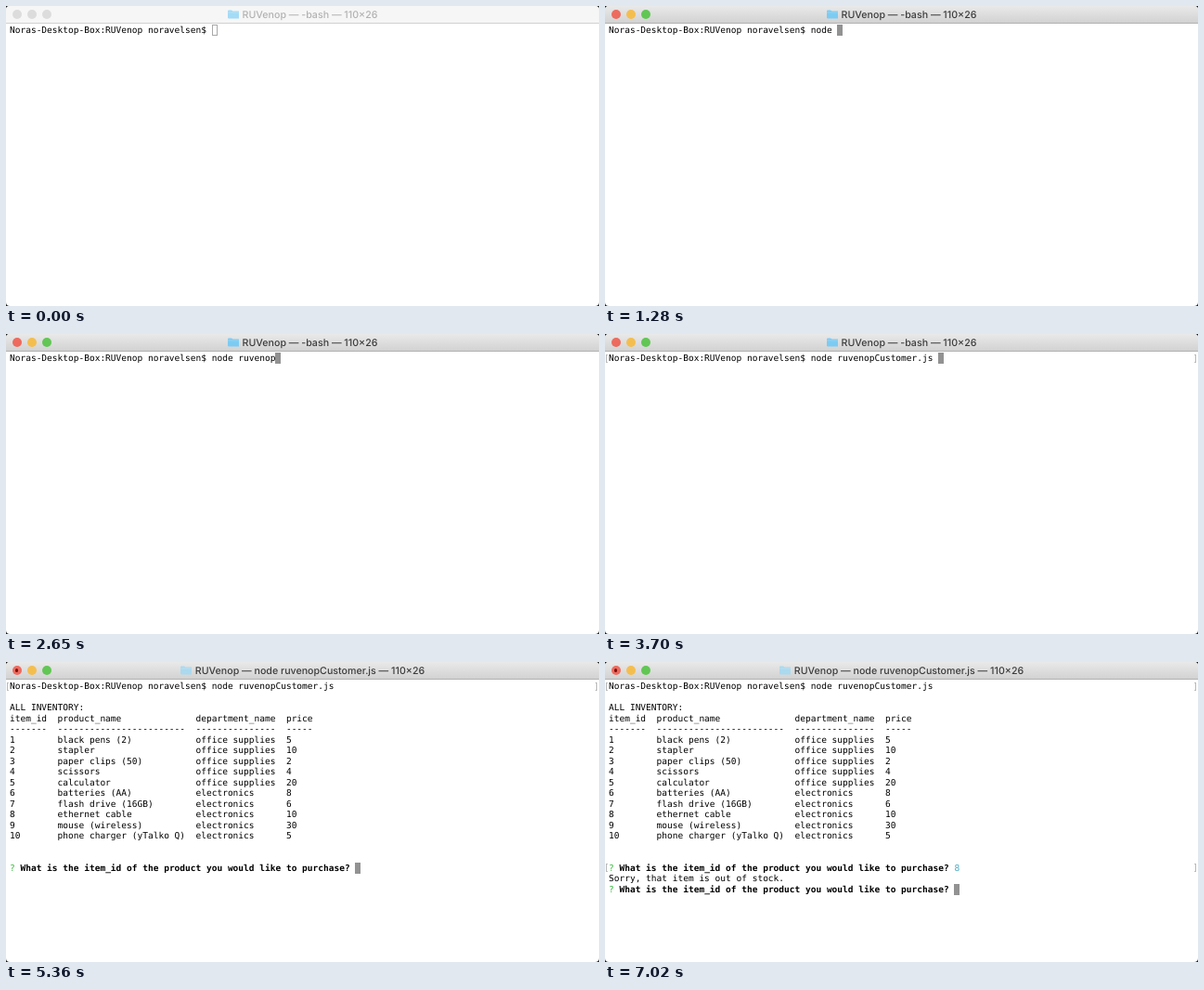
Write an HTML page that moves like this. It is 639x323 px and loops after 7.78 s.

```html
<!DOCTYPE html>
<html lang="en">
<head>
<meta charset="utf-8">
<title>Terminal session</title>
<style>
  html, body { margin: 0; width: 100%; height: 100%; overflow: hidden; background: #161616; }
  .window {
    position: relative; width: 639px; height: 323px; overflow: hidden;
    background: #fff; border-radius: 4px; text-rendering: geometricPrecision;
  }
  .bar {
    position: absolute; inset: 0 0 auto; height: 18px;
    display: flex; align-items: center; justify-content: center; gap: 3.5px;
    background: linear-gradient(#e9e9e9, #d2d2d2); border-bottom: 1px solid #b1b1b1;
    font: 500 10.65px/18px Inter, sans-serif; color: #3c3c3c; white-space: pre;
  }
  #title { position: relative; top: 1px; }
  .light { position: absolute; top: 4px; width: 10px; height: 10px; border-radius: 50%; }
  .close { left: 6.5px; background: #ed6a5e; }
  .mini { left: 22.8px; background: #f4be4f; }
  .zoom { left: 39px; background: #62c655; }
  .folder { width: 12.5px; height: 10px; fill: #7ccbf3; }
  .idle .bar { background: #f6f6f6; border-color: #d0d0d0; color: #b2b2b2; }
  .idle .light { background: #dcdcdc; }
  .idle .folder { fill: #a4dbf6; }
  .running .folder { fill: #abd9ee; }
  .running .close::after {
    content: ""; position: absolute; inset: 3.2px; border-radius: 50%; background: #7c0f0b;
  }
  .screen {
    position: absolute; left: 4px; top: 21.25px; margin: 0; color: #000;
    font: 9.53px/11.5px "DejaVu Sans Mono", monospace;
  }
  .cursor { background: #929292; padding: 1px .3px 0 0; }
  .idle .cursor { background: none; box-shadow: inset 0 0 0 1px #a8a8a8; }
  .ok { color: #35b83a; }
  .answer { color: #46a9c4; }
  .mark {
    position: absolute; left: 1px; width: 636px; height: 9px; box-sizing: border-box;
    border: solid #b8b8b8; border-width: 0 1px; visibility: hidden;
  }
  .mark::before, .mark::after {
    content: ""; position: absolute; top: 0; bottom: 0; width: 1px;
    border: solid #c4c4c4; border-width: 1px 0; box-sizing: border-box;
  }
  .mark::before { left: 0; }
  .mark::after { right: 0; }
  .mark.first { top: 22px; }
  .mark.second { top: 217px; }
  .entered .first, .answered .second { visibility: visible; }
</style>
</head>
<body>
<div class="window" id="window">
  <div class="bar">
    <i class="light close"></i><i class="light mini"></i><i class="light zoom"></i>
    <svg class="folder" viewBox="0 0 25 20"><path d="M0 3Q0 1 2 1H8L11 3H23Q25 3 25 5V17Q25 19 23 19H2Q0 19 0 17Z"/><path d="M0 6H25" stroke="#fff" stroke-opacity=".35"/></svg>
    <span id="title"></span>
  </div>
  <pre class="screen" id="screen"></pre>
  <i class="mark first"></i><i class="mark second"></i>
</div>
<script>
const LOOP = 7780;
const FOCUS = 100, ENTER = 3700, RUN = 4290, RETITLE = 4430, LIST = 5360, ANSWER = 6710, REPLY = 7020;
const COMMAND = "node ruvenopCustomer.js ";
const PROMPT = "Noras-Desktop-Box:RUVenop noravelsen$ ";
const CURSOR = '<span class="cursor"> </span>';
const QUESTION = '<span class="ok">?</span> <b>What is the item_id of the product you would like to purchase?</b> ';

// [time, number of characters typed]
const typing = [[0, 0], [820, 1], [980, 3], [1280, 5], [1590, 7], [1750, 8], [1900, 9],
  [2350, 10], [2500, 11], [2650, 12], [3240, 13], [ENTER, COMMAND.length]];

const office = "office supplies", tech = "electronics";
const products = [
  ["black pens (2)", office, 5], ["stapler", office, 10], ["paper clips (50)", office, 2],
  ["scissors", office, 4], ["calculator", office, 20], ["batteries (AA)", tech, 8],
  ["flash drive (16GB)", tech, 6], ["ethernet cable", tech, 10],
  ["mouse (wireless)", tech, 30], ["phone charger (yTalko Q)", tech, 5]
];
const widths = [7, 24, 15, 5];
const row = cells => cells.map((cell, i) => String(cell).padEnd(widths[i])).join("  ");
const inventory = [
  "", "ALL INVENTORY:",
  row(["item_id", "product_name", "department_name", "price"]),
  row(widths.map(n => "-".repeat(n))),
  ...products.map((product, i) => row([i + 1, ...product])),
  "", ""
].join("\n");

function output(t) {
  const typed = typing.filter(([start]) => t >= start).pop()[1];
  const line = PROMPT + COMMAND.slice(0, typed);
  if (t < RUN) return line + CURSOR;
  if (t < LIST) return line + "\n" + CURSOR;
  const listed = line + "\n" + inventory + "\n" + QUESTION;
  if (t < ANSWER) return listed + CURSOR;
  if (t < REPLY) return listed + "8" + CURSOR;
  return listed + '<span class="answer">8</span>\nSorry, that item is out of stock.\n' + QUESTION + CURSOR;
}

const frame = document.getElementById("window");
const title = document.getElementById("title");
const terminal = document.getElementById("screen");
let shown = "";

function draw(now) {
  const t = now % LOOP;
  const running = t >= RETITLE;
  const states = { idle: t < FOCUS, entered: t >= ENTER, running, answered: t >= REPLY };
  for (const name in states) frame.classList.toggle(name, states[name]);
  title.textContent = `RUVenop — ${running ? COMMAND.trim() : "-bash"} — 110×26`;
  const html = output(t);
  if (html !== shown) terminal.innerHTML = shown = html;
}

const start = performance.now();
function tick() {
  draw(performance.now() - start);
  requestAnimationFrame(tick);
}
tick();
</script>
</body>
</html>
```
